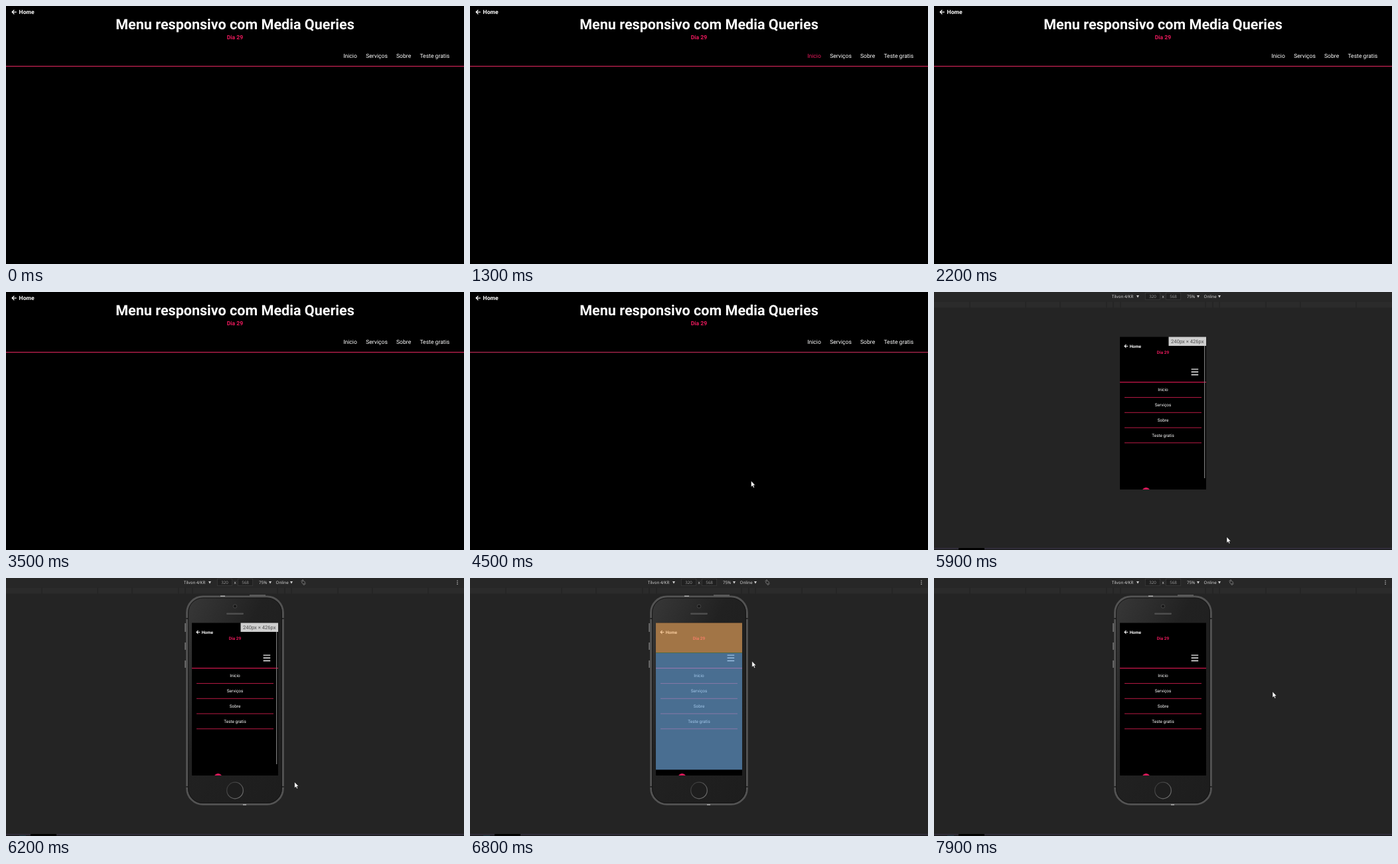
An HTML page that plays this animation: 690 by 388 pixels, repeating every 8000 ms.

```html
<!DOCTYPE html>
<html lang="pt">
<head>
<meta charset="utf-8">
<title>Menu responsivo</title>
<style>
  html, body { margin: 0; width: 100%; height: 100%; overflow: hidden; background: #000; }
  svg { display: block; width: 100vw; height: 100vh; }
  text { font-family: Roboto, Arial, sans-serif; fill: #fff; text-rendering: geometricPrecision; }
  .b { font-weight: 700; }
  .mid { text-anchor: middle; }
  .page { font-size: 8.6px; }
  .screen { font-size: 6.43px; }
  .page .pink, .screen .pink { fill: #e8195b; }
  .nav text.on { fill: #e8195b; }
  .bar text { font: 6.2px "Open Sans", "Noto Sans", sans-serif; fill: #dedede; }
  .bar .num { fill: #989898; }
</style>
</head>
<body>
<svg viewBox="0 0 690 388" preserveAspectRatio="none">
  <defs>
    <linearGradient id="gloss" x1="0" y1="0" x2="1" y2="1">
      <stop offset="0" stop-color="#383838"/>
      <stop offset=".22" stop-color="#2c2c2c"/>
      <stop offset=".4" stop-color="#212121"/>
      <stop offset="1" stop-color="#1d1d1d"/>
    </linearGradient>
    <linearGradient id="ring" x1="0" y1="0" x2="1" y2="1">
      <stop offset="0" stop-color="#303030"/>
      <stop offset="1" stop-color="#787878"/>
    </linearGradient>
    <clipPath id="glass"><rect x="280" y="67.5" width="130" height="229.5"/></clipPath>
    <path id="back" d="M7.2 3.8H.8M3.8 .6L.6 3.8L3.8 7" fill="none" stroke="#fff" stroke-width="1.3"/>
  </defs>

  <g id="desktop" class="page">
    <rect width="690" height="388"/>
    <use href="#back" x="8.6" y="5.3"/>
    <text class="b" x="19.6" y="12.4">Home</text>
    <text class="b mid" x="345" y="35.2" font-size="21.55">Menu responsivo com Media Queries</text>
    <text class="b mid pink" x="345" y="50.1">Dia 29</text>
    <g class="nav" id="nav">
      <text x="508.2" y="78.3">Inicio</text>
      <text x="542.2" y="78.3">Serviços</text>
      <text x="588" y="78.3">Sobre</text>
      <text x="623.4" y="78.3">Teste gratis</text>
    </g>
    <rect id="rule" y="90" width="690" height="1.2" fill="#cc2456"/>
  </g>

  <g id="tools">
    <rect width="690" height="388" fill="#242424"/>
    <rect width="690" height="14" fill="#272727"/>
    <g id="ruler"><rect y="14.5" width="690" height="9" fill="#2b2b2b"/></g>
    <g class="bar">
      <text x="268" y="9">Tilvon 4/KR</text>
      <g fill="#202020" stroke="#3c3c3c" stroke-width=".7">
        <rect x="318.3" y="1.6" width="22.4" height="10"/>
        <rect x="349.3" y="1.6" width="22.4" height="10"/>
      </g>
      <text class="num mid" x="329.5" y="9">320</text>
      <text class="mid" x="345" y="9.2">x</text>
      <text class="num mid" x="360.5" y="9">568</text>
      <text x="381" y="9">75%</text>
      <text x="406.6" y="9">Online</text>
      <path d="M305 4.9h4l-2 3.8zM396 4.9h4l-2 3.8zM428 4.9h4l-2 3.8z" fill="#cfcfcf"/>
    </g>
    <rect y="385" width="690" height="1" fill="#3b3548"/>
    <rect y="386" width="690" height="2" fill="#202024"/>
    <rect x="37" y="385" width="39" height="3"/>

    <g id="phone">
      <g fill="none" stroke="#8a8a8a" stroke-width=".8">
        <rect x="446" y="4.6" width="4" height="4" transform="rotate(45 448 6.6)"/>
        <path d="M444.6 5.2A3.7 3.7 0 0 1 448 2.8M451.4 8A3.7 3.7 0 0 1 448 10.4"/>
      </g>
      <path d="M679.4 3.4h1.3v1.3h-1.3zM679.4 6h1.3v1.3h-1.3zM679.4 8.6h1.3v1.3h-1.3z" fill="#bdbdbd"/>
      <rect x="20" y="387" width="10" height="1" fill="#203a44"/>
      <path d="M367 25.2h24v2h-24zM269.2 68h2v13h-2zM269.2 97h2v11h-2zM269.2 124h2v11h-2z" fill="#6a6a6a"/>
      <rect x="272.6" y="28" width="144.8" height="312.4" rx="24" fill="url(#gloss)" stroke="#535353" stroke-width="2.8"/>
      <rect x="274.6" y="30" width="140.8" height="308.4" rx="22" fill="none" stroke="#151515" stroke-width="1"/>
      <path d="M323 26.6h7v1.5h-7zM357 340.3h5v1.5h-5z" fill="#aaa"/>
      <path d="M271.2 60h2.8v2h-2.8zM416 60h2.8v2h-2.8zM271.2 313h2.8v2h-2.8zM416 313h2.8v2h-2.8z" fill="#262626"/>
      <circle cx="345" cy="42.5" r="2.7" fill="#181818" stroke="#4c4c4c" stroke-width=".9"/>
      <rect x="332" y="52.6" width="26" height="2.3" rx="1.1" fill="#4e4e4e"/>
      <circle cx="345" cy="319.5" r="12.3" fill="#1e1e1e" stroke="url(#ring)" stroke-width="1.2"/>
    </g>

    <g class="screen" clip-path="url(#glass)">
      <rect x="280" y="67" width="130" height="231"/>
      <use href="#back" transform="translate(286.6 78.5) scale(.78)"/>
      <text class="b" x="294.8" y="83.8">Home</text>
      <text class="b mid pink" x="345" y="92.8">Dia 29</text>
      <path d="M387.6 116.1h10.6M387.6 120.3h10.6M387.6 124.5h10.6" stroke="#eee" stroke-width="1.4"/>
      <rect x="280" y="135" width="130" height="1.2" fill="#d0184e"/>
      <g id="items"></g>
      <circle cx="319.5" cy="300" r="6" fill="#dc195a"/>
      <g id="inspect">
        <rect x="280" y="67" width="130" height="45" fill="#f6b26b" fill-opacity=".66"/>
        <rect x="280" y="112" width="130" height="1" fill="#93c47d" fill-opacity=".55"/>
        <rect x="280" y="113" width="130" height="175.3" fill="#6fa8dc" fill-opacity=".66"/>
      </g>
      <rect id="scroll" x="407" y="81" width="1.3" height="199" fill="#777"/>
      <g id="size">
        <rect x="353.5" y="67" width="57" height="14" fill="#cfcfcf"/>
        <text class="mid" x="381.8" y="77" font-size="7.6" style="fill:#505050">240px × 426px</text>
      </g>
    </g>
  </g>

  <path id="cursor" d="M0 0V9.2L2.1 7.3L3.5 10.4L5 9.7L3.6 6.7H6.3Z" fill="#fff" stroke="#000" stroke-width=".5"/>
</svg>
<script>
const LOOP = 8000, STEP = 100, ENTER = 4200;
const $ = id => document.getElementById(id);
const show = (id, on) => $(id).setAttribute("visibility", on ? "visible" : "hidden");

// mobile menu rows
$("items").innerHTML = ["Inicio", "Serviços", "Sobre", "Teste gratis"].map((label, i) => {
  const y = 149.4 + i * 22.75;
  return `<text class="mid" x="345" y="${y}">${label}</text>
    <rect x="287" y="${y + 8.6}" width="116" height="1.1" fill="#a8183f"/>`;
}).join("");

// ruler marks, mirrored around the centre
$("ruler").innerHTML += [64, 75, 85, 155, 207, 291].flatMap(d => [345 - d, 345 + d])
  .map(x => `<rect x="${x - .5}" y="14.5" width="1" height="9" fill="#202020"/>`).join("");

// hover spans per link
const hovers = [[1300, 1700], [1800, 2200], [2300, 2600], [2700, 3500]];
const links = [...$("nav").children];

// time, x, y of the pointer tip
const path = [
  [ENTER, 399, 199], [4300, 406, 227], [4700, 441, 341],
  [4800, 441, 346], [5100, 441.3, 368], [5200, 441.3, 368], [5400, 441.3, 369.6],
  [5800, 441.3, 369.6], [5900, 441, 368.2], [6000, 440, 352], [6300, 432, 284],
  [6500, 432, 284], [6800, 424.8, 125], [7200, 474.5, 128], [7600, 474.5, 128],
  [7900, 510, 170.8], [LOOP, 510, 170.8]
];

function pointAt(t) {
  const i = path.findIndex(p => p[0] > t);
  const [a, b] = [path[i - 1], path[i]];
  const k = (t - a[0]) / (b[0] - a[0]);
  return [a[1] + (b[1] - a[1]) * k, a[2] + (b[2] - a[2]) * k];
}

function draw(now) {
  const t = Math.floor(now % LOOP / STEP) * STEP;
  const mobile = t >= 5900;
  $("desktop").style.display = mobile ? "none" : "";
  $("tools").style.display = mobile ? "" : "none";
  links.forEach((el, i) => el.classList.toggle("on", t >= hovers[i][0] && t < hovers[i][1]));
  $("rule").setAttribute("fill", t < 3900 ? "#cc2456" : "#b82a54");
  show("phone", t >= 6000);
  show("scroll", t < 6300);
  show("size", t < 6600);
  show("inspect", t >= 6600 && t < 7100);
  show("cursor", t >= ENTER);
  if (t >= ENTER) $("cursor").setAttribute("transform", `translate(${pointAt(t)})`);
}

const start = performance.now();
function tick() {
  draw(performance.now() - start);
  requestAnimationFrame(tick);
}
tick();
</script>
</body>
</html>
```
